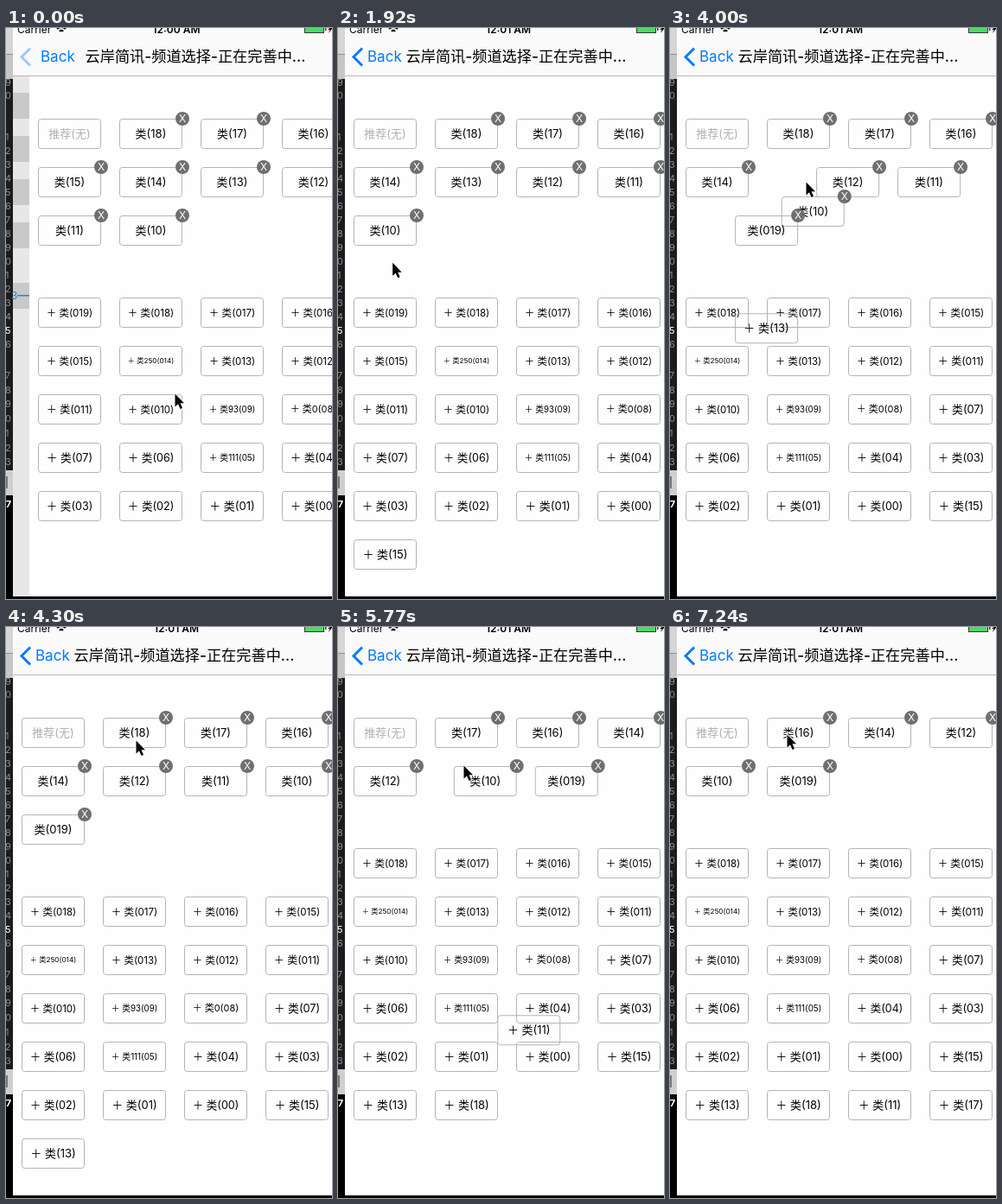
These frames come from a looping animation (377x661 px, 8000 ms). An HTML page with a canvas:

```html
<!DOCTYPE html>
<html lang="zh-CN">
<head>
<meta charset="utf-8">
<style>
html, body { margin: 0; width: 377px; height: 661px; overflow: hidden; background: #000; }
canvas { display: block; }
</style>
</head>
<body>
<canvas id="stage" width="377" height="661"></canvas>
<script>
const ctx = document.getElementById('stage').getContext('2d');
const FONT = 'Inter, "Noto Sans CJK SC", "Noto Sans CJK", sans-serif';
const LOOP = 8000, TICK = 147.9, LAST_TICK = 49, MOVE = 250;
const TILE_W = 73, TILE_H = 35, TEXT_W = 53.5;

// Each tap: start time (ms) and the channel that changes list.
const taps = [
  [1370, '类(15)'], [2758, '类(019)'], [3889, '类(13)'],
  [4661, '类(18)'], [5600, '类(11)'], [6400, '类(17)']
];

// Pointer keys: tick, x, y.
const pointer = [
  [0, 195, 423], [2, 175, 345], [5, 118, 208], [6, 118, 208], [7, 104, 183],
  [9, 64, 177], [11, 62, 190], [14, 63, 312], [15, 62, 314], [16, 62, 314],
  [17, 64, 326], [21, 64, 326], [24, 150, 185], [25, 157, 168], [26, 157, 168],
  [27, 157, 178], [29, 150, 131], [32, 150, 131], [33, 154, 163],
  [35, 150, 170], [39, 145, 160], [40, 146, 161], [43, 140, 121],
  [44, 139, 121], [46, 63, 127], [47, 63, 127], [49, 135, 124]
];

const lerp = (a, b, p) => a + (b - a) * p;
const ease = p => p * p * (3 - 2 * p);
const clamp = p => Math.max(0, Math.min(1, p));

function layout(chosen, others) {
  const places = new Map();
  const place = (list, top, picked) => list.forEach((name, i) =>
    places.set(name, { x: 18 + 94 * (i % 4), y: top + 56 * (i >> 2), picked }));
  place(chosen, 105, true);
  place(others, 144 + 56 * Math.ceil(chosen.length / 4), false);
  return places;
}

function buildLayouts() {
  let chosen = ['推荐(无)'], others = [];
  const prefix = { '014': 250, '09': 93, '08': 0, '05': 111 };
  for (let i = 18; i >= 10; i--) chosen.push(`类(${i})`);
  for (let i = 19; i >= 0; i--) {
    const id = i > 9 ? '0' + i : '0' + i % 10;
    others.push(`类${prefix[id] ?? ''}(${id})`);
  }
  const result = [layout(chosen, others)];
  for (const [, name] of taps) {
    const target = chosen.includes(name) ? others : chosen;
    chosen = chosen.filter(n => n !== name);
    others = others.filter(n => n !== name);
    (target.includes(name) || result.at(-1).get(name).picked ? others : chosen).push(name);
    result.push(layout(chosen, others));
  }
  return result;
}
const layouts = buildLayouts();

function rect(x, y, w, h, color) {
  ctx.fillStyle = color;
  ctx.fillRect(x, y, w, h);
}

function text(str, x, y, size, color = '#000', weight = 400, align = 'left') {
  ctx.font = `${weight} ${size}px ${FONT}`;
  ctx.fillStyle = color;
  ctx.textAlign = align;
  ctx.fillText(str, x, y);
}

function path(points, close) {
  ctx.beginPath();
  points.forEach(([x, y]) => ctx.lineTo(x, y));
  if (close) ctx.closePath();
}

function drawEditor() {
  rect(0, 0, 8, 60, '#c6c6c6');
  rect(0, 0, 8, 30, '#d6d6d6');
  rect(0, 30, 8, 1, '#8f8f8f');
  rect(0, 59, 8, 453, '#1c1c1f');
  text('9', -1, 67, 11, '#8d8d8d');
  text('0', -1, 82, 11, '#8d8d8d');
  for (let k = 1; k <= 23; k++) {
    const y = k < 17 ? 130 + 16 * (k - 1) : 406 + 16.7 * (k - 17);
    text(k % 10, -1, y, 11, k === 15 ? '#fff' : '#8d8d8d');
  }
  rect(0, 512, 8, 29, '#cfcfcf');
  rect(0, 519, 2, 14, '#777');
  text('17', -5, 555, 11, '#fff', 700);
}

function drawPreviousPage(width) {
  rect(8, 56, width, 602, '#e7e7e7');
  for (const y of [75, 125, 175, 225, 295]) rect(8, y, width, 30, '#c9c9c9');
  rect(13, 309, Math.max(0, width - 5), 1.5, '#2b83d8');
  if (width > 5) text('3', 6, 314, 12, '#2b83d8');
}

function drawBars(slide, tick) {
  rect(8, 0, 369, 55, '#fafafa');
  rect(8, 55, 369, 1, '#b8b8b8');
  text('Carrier', 13, 6, 12);
  ctx.lineWidth = 2;
  ctx.strokeStyle = '#000';
  for (const r of [3, 7]) {
    ctx.beginPath();
    ctx.arc(64, 6, r, -2.35, -0.79);
    ctx.stroke();
  }
  text(`12:0${tick < 3 ? 0 : 1} AM`, 197, 6, 12, '#000', 600, 'center');
  rect(345, -3, 23, 9, '#333');
  rect(346, -3, 21, 8, '#4cd964');
  rect(369, 0, 1.5, 3, '#333');
  ctx.fillStyle = '#000';
  path([[377, -2], [372, 2], [374.5, 2], [373, 6], [377, 1]], true);
  ctx.fill();

  ctx.globalAlpha = 1 - 0.62 * slide;
  ctx.strokeStyle = '#007aff';
  ctx.lineWidth = 3;
  path([[28, 23.5], [18, 33.5], [28, 43.5]]);
  ctx.stroke();
  ctx.globalAlpha = 1;
  text('Back', 34 + 6 * slide, 39, 17, '#007aff');
  text('云岸简讯-频道选择-正在完善中...', 78.5 + 13 * slide, 39, 17.2, '#000', 500);
}

function drawTile(name, x, y, picked) {
  const fixed = name.startsWith('推荐');
  const label = picked ? name : '＋ ' + name;
  const cx = x + TILE_W / 2;
  ctx.strokeStyle = '#b4b4b4';
  ctx.lineWidth = 1;
  ctx.beginPath();
  ctx.roundRect(x + 0.5, y + 0.5, TILE_W - 1, TILE_H - 1, 3);
  ctx.stroke();
  ctx.font = `400 13px ${FONT}`;
  const size = 13 * Math.min(1, TEXT_W / ctx.measureText(label).width);
  text(label, cx, y + 17.5 + 0.36 * size, size, fixed ? '#b0b0b0' : '#000', 400, 'center');
  if (!picked || fixed) return;
  ctx.fillStyle = '#6f6f6f';
  ctx.beginPath();
  ctx.arc(x + TILE_W, y, 8, 0, 7);
  ctx.fill();
  text('X', x + TILE_W, y + 4.4, 12, '#fff', 400, 'center');
}

function drawTiles(time, shift) {
  const step = taps.filter(([start]) => start <= time).length;
  const to = layouts[step], from = layouts[Math.max(0, step - 1)];
  const p = step ? ease(clamp((time - taps[step - 1][0]) / MOVE)) : 1;
  for (const [name, b] of to) {
    const a = from.get(name);
    drawTile(name, lerp(a.x, b.x, p) + shift, lerp(a.y, b.y, p), b.picked);
  }
}

function drawPointer(tick) {
  const i = Math.max(1, pointer.findIndex(k => k[0] >= tick));
  const [t0, x0, y0] = pointer[i - 1], [t1, x1, y1] = pointer[i];
  const p = (tick - t0) / (t1 - t0);
  ctx.save();
  ctx.translate(lerp(x0, x1, p) + 0.5, lerp(y0, y1, p) + 0.5);
  path([[0, 0], [0, 15], [3.5, 11.8], [6, 17.5], [8.5, 16.4], [6, 10.8], [10.5, 10.8]], true);
  ctx.lineWidth = 2;
  ctx.strokeStyle = '#fff';
  ctx.stroke();
  ctx.fillStyle = '#000';
  ctx.fill();
  ctx.restore();
}

function draw(now) {
  const tick = Math.min(LAST_TICK, Math.floor((now % LOOP) / TICK + 0.1));
  const slide = tick < 4 ? Math.exp(-1.1 * tick) : 0;
  const shift = Math.round(19 * slide);
  rect(0, 0, 377, 661, '#000');
  drawEditor();
  rect(8, 0, 369, 658, '#fefefe');
  if (shift) drawPreviousPage(shift);
  drawTiles(tick * 148, shift);
  drawBars(slide, tick);
  drawPointer(tick);
}

let origin;
function frame(now) {
  origin ??= now;
  draw(now - origin);
  requestAnimationFrame(frame);
}
requestAnimationFrame(frame);
</script>
</body>
</html>
```
